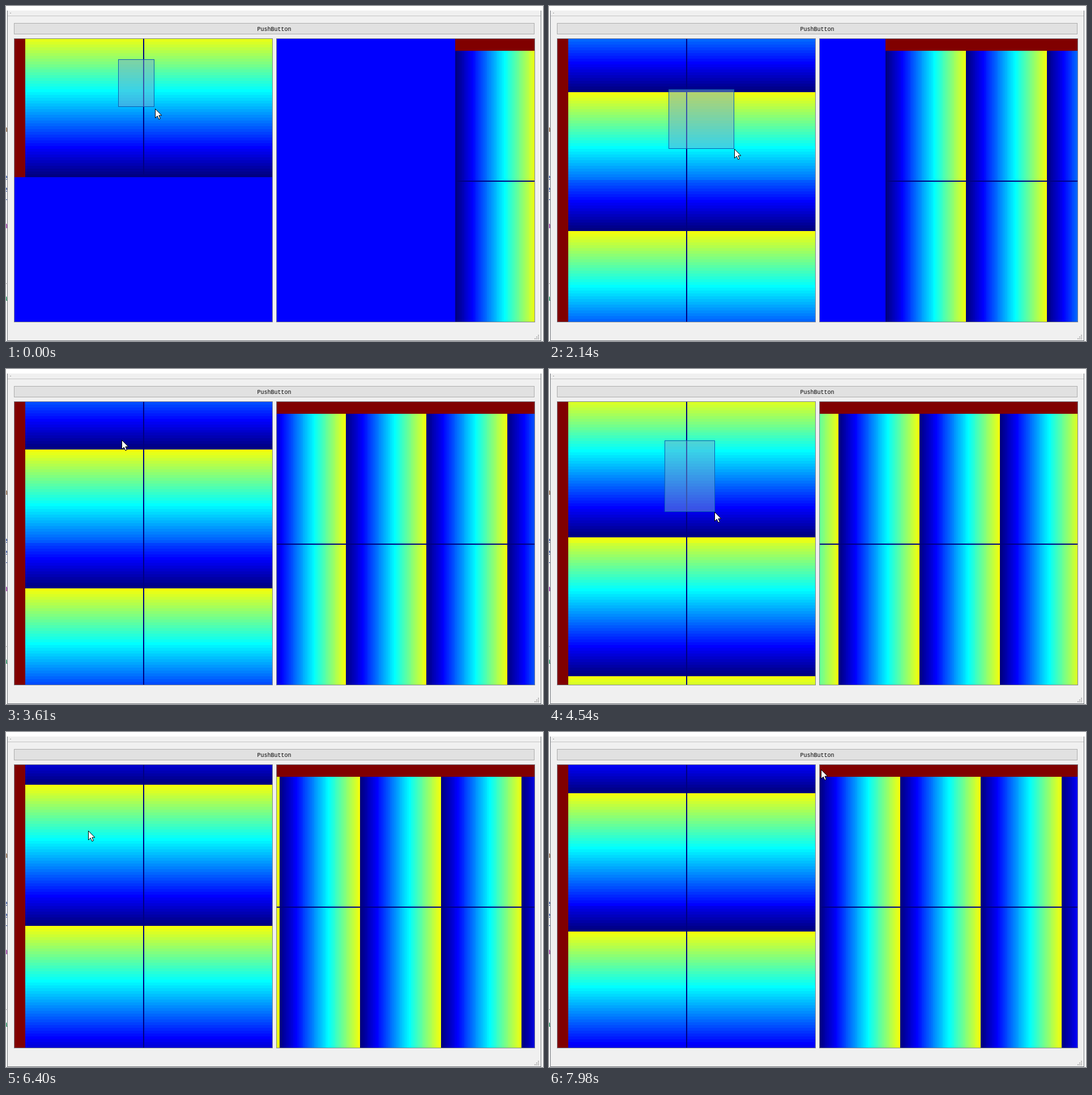
Recreate the animation shown at these times as an HTML page with a canvas. Size 948 px wide and 591 px high, loop 8000 ms.

```html
<!DOCTYPE html>
<html lang="en">
<head>
<meta charset="utf-8">
<title>Waterfall panels</title>
<style>
  html, body { margin: 0; width: 100%; height: 100%; overflow: hidden; background: #fff; }
  .window { position: absolute; left: 2px; top: 8px; width: 941px; height: 582px; background: #f0f0f0;
    border: solid #70747a; border-width: 0 1px 1px; }
  .strip { position: absolute; left: 3px; top: 17px; width: 941px; height: 1px; background: #c4c4c4; }
  .dot { position: absolute; left: 7px; top: 12px; width: 2px; height: 1px; background: #999; }
  .button { position: absolute; left: 14px; top: 30px; width: 917px; height: 18px; background: #e1e1e1;
    border: 1px solid #adadad; color: #000; text-align: center;
    font: 10px/21px "Liberation Mono", monospace; }
  .edge { position: absolute; right: 945px; font: 14px/14px "Liberation Mono", monospace; }
  .grip { position: absolute; left: 933px; top: 580px; }
  canvas { position: absolute; left: 0; top: 0; }
</style>
</head>
<body>
<div class="edge" style="top:211px;color:#7a4a20">n</div>
<div class="edge" style="top:296px;color:#1a3f9a">e</div>
<div class="edge" style="top:317px;color:#1a3f9a">e</div>
<div class="edge" style="top:338px;color:#1a3f9a">r</div>
<div class="edge" style="top:381px;color:#90109a">n</div>
<div class="edge" style="top:483px;color:#222">-</div>
<div class="edge" style="top:509px;color:#0a8a50">a</div>
<div class="window"></div>
<div class="strip"></div>
<div class="dot"></div>
<div class="button">PushButton</div>
<svg class="grip" width="10" height="10" fill="#b4b4b4">
  <path d="M6 0h2v2h-2zM3 3h2v2h-2zM6 3h2v2h-2zM0 6h2v2h-2zM3 6h2v2h-2zM6 6h2v2h-2z"/>
</svg>
<canvas id="view" width="948" height="591"></canvas>
<script>
const ctx = document.getElementById('view').getContext('2d');
const LOOP = 8000, PERIOD = 50;
const BLUE = '#0000ff', RED = '#800000', NAVY = '#000080';

// [end time, equal steps leading up to it]
const spans = [[120, 1], [1060, 7], [1180, 1], [2140, 7], [2290, 1], [3330, 8], [3480, 1], [3610, 1],
  [3730, 1], [4390, 5], [4540, 1], [4660, 1], [5580, 7], [5710, 1], [5860, 1], [6640, 6], [6760, 1],
  [7140, 3], [7290, 1], [7710, 3], [7830, 1], [7980, 1]];
const steps = [0];
for (const [end, n] of spans) {
  const start = steps[steps.length - 1];
  for (let i = 1; i <= n; i++) steps.push(Math.round(start + (end - start) * i / n));
}

// pointer stops: time, x, y
const stops = [[-80, 259, 173], [0, 263, 181], [250, 267, 188], [950, 211, 147], [1180, 211, 147],
  [2140, 327, 252], [2290, 327, 252], [3350, 204, 125], [3610, 204, 125], [4540, 292, 252],
  [4660, 292, 252], [5600, 84, 141], [5860, 84, 141], [7140, 253, 232], [7290, 253, 232],
  [7980, 480, 66], [8000, 480, 66]];
// selections: from, until, anchor x, anchor y
const drags = [[0, 250, 198, 94], [1180, 2290, 211, 147], [3620, 4660, 204, 126]];

const channel = (v, c) => Math.round(255 * Math.min(1, Math.max(0, 1.5 - Math.abs(4 * v - c))));
const palette = Array.from({ length: PERIOD }, (_, i) => {
  const v = i / 80;
  return `rgb(${channel(v, 3)},${channel(v, 2)},${channel(v, 1)})`;
});

function fill(color, x0, y0, x1, y1) {
  ctx.fillStyle = color;
  ctx.fillRect(x0, y0, x1 - x0, y1 - y0);
}

function frame(x, y, w, h, color) {
  ctx.strokeStyle = color;
  ctx.lineWidth = 1;
  ctx.strokeRect(x + .5, y + .5, w - 1, h - 1);
}

function pointer(t) {
  let i = 1;
  while (i < stops.length - 1 && stops[i][0] < t) i++;
  const [t0, x0, y0] = stops[i - 1], [t1, x1, y1] = stops[i];
  const k = Math.min(1, Math.max(0, (t - t0) / (t1 - t0))), e = k * k * (3 - 2 * k);
  return [Math.round(x0 + (x1 - x0) * e), Math.round(y0 + (y1 - y0) * e)];
}

// newest row on top
function leftPanel(count, late) {
  const edge = i => Math.min(557, Math.floor(58.1 + 4.99 * i));
  fill(BLUE, 15, 58, 470, 557);
  for (let i = 0; i < 100; i++) {
    const item = count - 1 - (late || i >= 50 ? i + 1 : i);
    if (item < 0) break;
    const y0 = edge(i), y1 = edge(i + 1);
    fill(palette[item % PERIOD], 34, y0, 470, y1);
    fill(RED, 15, y0, 34, y1);
    fill(NAVY, 242, y0, 244, y1);
  }
  frame(14, 57, 457, 501, '#828790');
}

// newest column at the right
function rightPanel(count) {
  const edge = i => Math.max(478, Math.round(933 - 2.85 * i));
  fill(BLUE, 478, 58, 933, 557);
  for (let i = 0; i < 160 && i < count; i++) {
    const x0 = edge(i + 1), x1 = edge(i);
    fill(palette[(count - 1 - i) % PERIOD], x0, 79, x1, 557);
    fill(RED, x0, 58, x1, 79);
    fill(NAVY, x0, 308, x1, 310);
  }
  frame(477, 57, 457, 501, '#828790');
}

function selection(t) {
  const drag = drags.find(d => t >= d[0] && t < d[1]);
  if (!drag) return;
  const [x, y] = drag.slice(2), [px, py] = pointer(t - 40);
  const w = px - x + 1, h = py - y + 1;
  if (w < 3 || h < 3) return;
  fill('rgba(115,168,210,.5)', x, y, x + w, y + h);
  frame(x, y, w, h, '#0a5fb0');
}

const arrow = new Path2D('M.5 .5V16.5L4.2 13L6.8 18.8L9.4 17.7L6.9 12H11.8Z');

function cursor(t) {
  ctx.save();
  ctx.translate(...pointer(t));
  ctx.fillStyle = '#fff';
  ctx.strokeStyle = '#000';
  ctx.lineWidth = 1;
  ctx.fill(arrow);
  ctx.stroke(arrow);
  ctx.restore();
}

function draw(t) {
  const count = Math.floor(49.64 + t / 30.6);
  ctx.clearRect(0, 0, 948, 591);
  leftPanel(count, t > 4600 && t < 7600);
  rightPanel(count);
  selection(t);
  cursor(t);
}

let shown = -1;
const begin = performance.now();
function tick(now) {
  const t = Math.max(0, now - begin) % LOOP;
  let i = steps.length - 1;
  while (steps[i] > t) i--;
  if (i !== shown) draw(steps[shown = i]);
  requestAnimationFrame(tick);
}
tick(begin);
</script>
</body>
</html>
```
